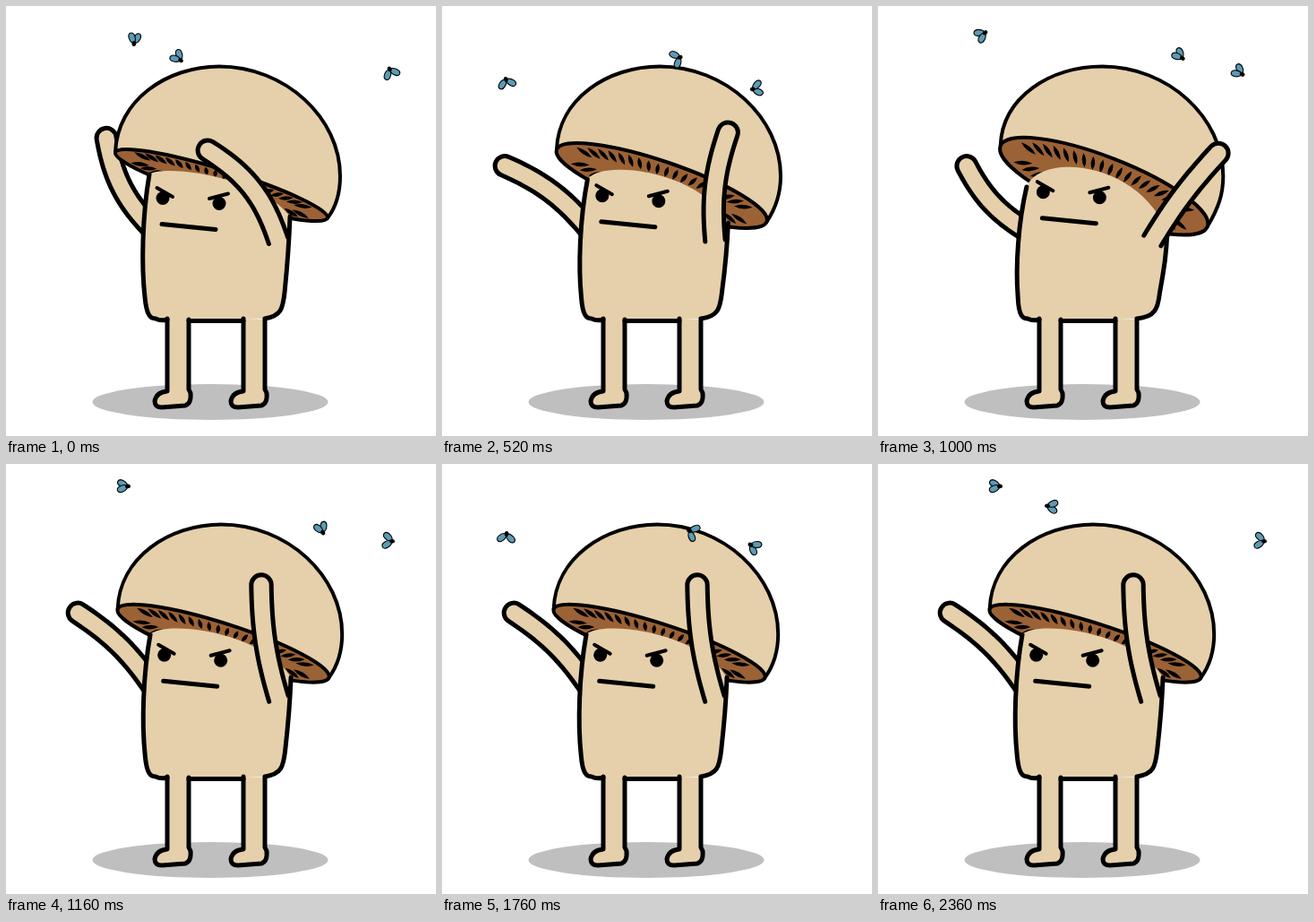
An HTML page for the animation above (2400 ms loop, 480 by 480 pixels).

```html
<!DOCTYPE html>
<html lang="en">
<head>
<meta charset="utf-8">
<title>Mushroom and flies</title>
<style>
html, body { margin: 0; width: 100%; height: 100%; overflow: hidden; background: #fff; }
svg { display: block; width: 100vw; height: 100vh; }
.skin { fill: #e5d0ab; }
.line { stroke: #000; stroke-width: 5; stroke-linecap: round; stroke-linejoin: round; }
.thin { stroke-width: 4; }
.bare { fill: none; }
.wing { fill: #5b9bb5; stroke: #000; stroke-width: 1.1; }
</style>
</head>
<body>
<svg viewBox="0 0 480 480">
  <ellipse cx="228" cy="442" rx="131.5" ry="20" fill="#bfbfbf"/>
  <path id="armL" class="skin line"/>
  <path id="dome" class="skin line thin"/>
  <g id="gills">
    <ellipse id="rim" fill="#9b6236" class="line thin"/>
    <path id="marks"/>
  </g>
  <path id="body" class="skin"/>
  <path id="leg" class="skin line" d="M180 349V430Q168 431 166 441Q166 448 174 448L200 446Q207 444 206 432L204 428V350"/>
  <use href="#leg" x="85"/>
  <path id="sides" class="bare line"/>
  <g id="face">
    <circle cx="175" cy="214.5" r="7.5"/>
    <circle cx="238" cy="220.5" r="7.5"/>
    <path class="bare line thin" d="M168.5 203L186 213M227 215L248 209.5"/>
    <path class="bare line" d="M174 243.5L234 249.5"/>
  </g>
  <path id="armR" class="skin line"/>
  <g id="flies"></g>
</svg>
<script>
const LOOP = 2400, SWAY = 600, STEP = 40;
const $ = id => document.getElementById(id);
const set = (id, d) => $(id).setAttribute('d', d);
const mix = (a, b, u) => a + (b - a) * u;
const fmt = n => n.toFixed(2);

// hand swings: time, x, y, elbow bend
const rightSwing = [[0, 225, 161, 23], [200, 277, 160, 38], [280, 341, 143, 13], [420, 378, 165, -8], [560, 285, 135, -9]];
const leftSwing = [[0, 112, 147, -18], [200, 175, 150, -50], [280, 165, 150, -52], [460, 72, 188, 5], [560, 80, 166, 12]];

// flight loops: time, x, y
const flights = [
  { period: 1200, stops: [[0, 143, 38], [200, 130, 82], [280, 97, 98], [560, 72, 82], [800, 98, 48], [1160, 132, 25]] },
  { period: 2400, stops: [[0, 192, 58], [280, 224, 74], [800, 307, 43], [1160, 352, 73], [1400, 335, 100], [1760, 280, 76], [2360, 193, 47]] },
  { period: 1200, stops: [[0, 430, 74], [200, 413, 58], [280, 393, 71], [560, 348, 92], [800, 374, 62], [1160, 427, 86]] }
];

// smooth closed curve through timed stops
function follow(stops, t, period) {
  const n = stops.length;
  t = (t + period) % period;
  let i = n - 1;
  while (stops[i][0] > t) i--;
  const at = (j, c) => stops[(j + n) % n][c] + (c ? 0 : Math.floor(j / n) * period);
  const dt = at(i + 1, 0) - at(i, 0), u = (t - at(i, 0)) / dt, v = 1 - u;
  return stops[0].slice(1).map((_, k) => {
    const c = k + 1;
    const rate = j => (at(j + 1, c) - at(j - 1, c)) / (at(j + 1, 0) - at(j - 1, 0)) * dt;
    return v * v * (1 + 2 * u) * at(i, c) + u * v * v * rate(i)
      - u * u * v * rate(i + 1) + u * u * (3 - 2 * u) * at(i + 1, c);
  });
}

// tube of constant width from shoulder to hand, open at the shoulder
function arm(sx, sy, [hx, hy, bend], r) {
  const len = Math.hypot(hx - sx, hy - sy);
  const ex = (sx + hx) / 2 - (hy - sy) / len * bend;
  const ey = (sy + hy) / 2 + (hx - sx) / len * bend;
  const axis = (s, e, h) => {
    const a = mix(s, e, .75), b = mix(h, e, .75);
    return [
      u => (1 - u) ** 3 * s + 3 * (1 - u) ** 2 * u * a + 3 * (1 - u) * u * u * b + u ** 3 * h,
      u => (1 - u) ** 2 * (a - s) + 2 * (1 - u) * u * (b - a) + u * u * (h - b)
    ];
  };
  const [px, vx] = axis(sx, ex, hx), [py, vy] = axis(sy, ey, hy);
  const near = [], far = [];
  for (let k = 0; k <= 20; k++) {
    const u = k / 20, l = Math.hypot(vx(u), vy(u));
    const nx = vy(u) / l * r, ny = -vx(u) / l * r;
    near.push(fmt(px(u) + nx) + ' ' + fmt(py(u) + ny));
    far.unshift(fmt(px(u) - nx) + ' ' + fmt(py(u) - ny));
  }
  return `M${near.join('L')}A${r} ${r} 0 0 1 ${far.join('L')}`;
}

function leaf(x1, y1, x2, y2, w) {
  const dx = x2 - x1, dy = y2 - y1, l = Math.hypot(dx, dy);
  const mx = (x1 + x2) / 2, my = (y1 + y2) / 2, nx = -dy / l * w, ny = dx / l * w;
  return `M${fmt(x1)} ${fmt(y1)}Q${fmt(mx + nx)} ${fmt(my + ny)} ${fmt(x2)} ${fmt(y2)}` +
    `Q${fmt(mx - nx)} ${fmt(my - ny)} ${fmt(x1)} ${fmt(y1)}`;
}

function drawCap(u) {
  const rx = 124, ry = 17 + u * (25 - 10 * u), tilt = mix(17.2, 20.7, u);
  const cx = mix(240.5, 250.5, u), cy = mix(200, 201, u), d = 10.5 * u;
  const c = Math.cos(tilt * Math.PI / 180) * rx, s = Math.sin(tilt * Math.PI / 180) * rx;
  const lx = cx - c, ly = cy - s;
  set('dome', `M${lx} ${ly}C${lx + 2} ${105 - u * 3} ${180 + d} 67.5 ${238 + d} 67.5` +
    `C${312 + d} 67.5 ${373 + d} 125 ${373 + d} 190C${373 + d} 210 ${368 + d} 225 ${cx + c} ${cy + s}Z`);
  $('gills').setAttribute('transform', `translate(${cx} ${cy}) rotate(${tilt})`);
  $('rim').setAttribute('rx', rx);
  $('rim').setAttribute('ry', ry);
  let marks = '';
  for (let k = -.9; k < .95; k += .1) {
    const h = Math.sqrt(1 - k * k) * ry;
    for (const side of [-h, h]) marks += leaf(.93 * rx * k, .84 * side, .75 * rx * k, .38 * side, 4.6);
  }
  set('marks', marks);
}

function drawBody(u) {
  const pt = (a, b, c, d) => fmt(mix(a, c, u)) + ' ' + fmt(mix(b, d, u));
  const topL = pt(160, 188, 165, 200), topR = pt(317, 235, 322, 250);
  const left = `M${topL}C${pt(152, 235, 156, 240)} ${pt(151, 290, 153, 290)} ${pt(155, 325, 156, 325)}` +
    `C157 347 162 349 167 349Q173 352 180 350`;
  const right = `289 349C${pt(307, 346, 309, 347)} ${pt(309, 338, 312, 338)} ${pt(311, 320, 314, 320)}` +
    `C${pt(314, 290, 319, 290)} ${pt(316, 265, 321, 275)} ${topR}`;
  set('sides', `${left}M204 351.5L265 351.5M${right}`);
  set('body', `${left}L204 351L${right}C${pt(285, 190, 290, 175)} ${pt(175, 176, 180, 165)} ${topL}Z`);
  $('face').setAttribute('transform', `translate(${8 * u} ${-5.8 * u})`);
}

const wing = '<path class="wing" d="M0 0C-3 -5 -12 -5.5 -12.5 -.5C-12 4 -3 4 0 0Z"/>';
$('flies').innerHTML = flights.map(() => `<g>${wing}${wing}<ellipse cx="4" rx="3" ry="2.3"/></g>`).join('');

function drawFly(g, { stops, period }, t, i) {
  const [x, y] = follow(stops, t % period, period);
  const [x2, y2] = follow(stops, (t + 1) % period, period);
  const turn = Math.atan2(y2 - y, x2 - x) * 180 / Math.PI;
  const open = 36 - 12 * Math.cos(t / LOOP * 4 * Math.PI + i);
  g.setAttribute('transform', `translate(${x} ${y}) rotate(${turn})`);
  [open, -open].forEach((a, k) => g.children[k].setAttribute('transform', `translate(4 0) rotate(${a})`));
}

function draw(t) {
  const s = t % SWAY;
  // 0 and 1 are the two drawn poses; the sway runs slightly past both
  const u = .55 - .68 * Math.cos((s - 60) / SWAY * 2 * Math.PI);
  drawCap(u);
  drawBody(u);
  set('armL', arm(165, 250, follow(leftSwing, s, SWAY), 11));
  set('armR', arm(304 + 2 * u, 262, follow(rightSwing, s, SWAY), 11.2));
  [...$('flies').children].forEach((g, i) => drawFly(g, flights[i], t, i));
}

const start = performance.now();
function tick() {
  const t = (performance.now() - start) % LOOP;
  draw(Math.floor(t / STEP) * STEP);
  requestAnimationFrame(tick);
}
tick();
</script>
</body>
</html>
```
